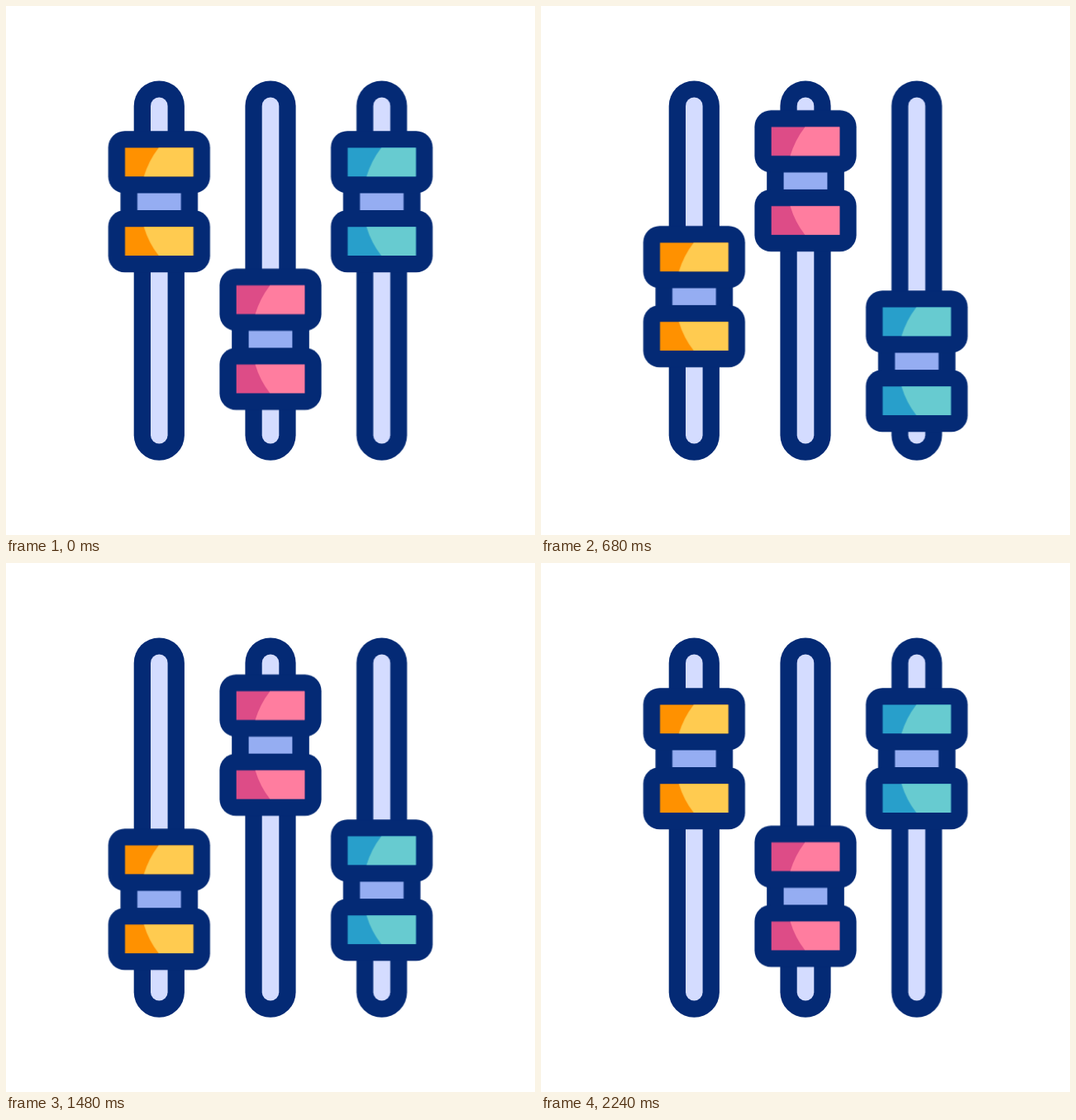
These frames come from a looping animation (640 by 640 pixels, 2.3 s). An HTML page:

```html
<!DOCTYPE html>
<html lang="en">
<head>
<meta charset="utf-8">
<title>Sliders</title>
<style>
  html, body { margin: 0; width: 100%; height: 100%; overflow: hidden; background: #fff; }
  svg { display: block; width: 100%; height: 100%; }
  .ink { fill: #042a75; }
  .rail { fill: #d4dcff; }
  .neck { fill: #95adf2; }
  .shade { fill: var(--shade); }
  .tint { fill: var(--tint); }

  .amber { --shade: #ff9100; --tint: #ffcb50; }
  .pink { --shade: #dd4c87; --tint: #ff7d9f; }
  .teal { --shade: #289fcb; --tint: #67cbd0; }

  /* offsets are measured from the resting height of the outer knobs */
  .knob { animation: 2300ms cubic-bezier(.333, 0, .667, 1) infinite; }
  .amber .knob { animation-name: amber; }
  .pink .knob { animation-name: pink; }
  .teal .knob { animation-name: teal; }

  @keyframes amber {
    0%, 8.696%, 41.522%, 50.435%, 85.52%, 100% { transform: translateY(0); }
    21.435%, 66.696% { transform: translateY(180px); }
  }
  @keyframes pink {
    0%, 90.217%, 100% { transform: translateY(166.5px); }
    8.696% { transform: translateY(166.5px); animation-timing-function: ease-out; }
    28.478%, 67.565% { transform: translateY(-26px); }
    50.348% { transform: translateY(81.5px); }
  }
  @keyframes teal {
    0%, 8.696%, 43.565%, 97.391%, 100% { transform: translateY(0); }
    30.913%, 32.087% { transform: translateY(195px); }
    70%, 71.304% { transform: translateY(180px); }
  }
</style>
</head>
<body>
<svg viewBox="0 0 640 640">
  <defs>
    <g id="rail">
      <rect class="ink" x="-30.6" y="90.4" width="61.2" height="459.4" rx="30.6"/>
      <rect class="rail" x="-10.3" y="110.6" width="20.6" height="419" rx="10.3"/>
    </g>
    <g id="knob">
      <rect class="ink" x="-46.8" y="200" width="93.6" height="74"/>
      <rect class="ink" x="-61.6" y="151.2" width="123.2" height="75.3" rx="20"/>
      <rect class="ink" x="-61.6" y="247" width="123.2" height="75.3" rx="20"/>
      <rect class="neck" x="-26.4" y="226.5" width="52.8" height="20.5"/>
      <path class="shade" d="M-41.3 171.4h82.6v34.9h-82.6zM-41.3 267.2h82.6v34.9h-82.6z"/>
      <path class="tint" d="M-.6 171.4A108 108 0 0 0 -18.5 206.3H41.3V171.4zM-18.5 267.2A108 108 0 0 0 -.6 302.1H41.3V267.2z"/>
    </g>
  </defs>
  <g class="amber" transform="translate(185.3)">
    <use href="#rail"/>
    <g class="knob"><use href="#knob"/></g>
  </g>
  <g class="pink" transform="translate(320)">
    <use href="#rail"/>
    <g class="knob"><use href="#knob"/></g>
  </g>
  <g class="teal" transform="translate(454.6)">
    <use href="#rail"/>
    <g class="knob"><use href="#knob"/></g>
  </g>
</svg>
</body>
</html>
```
